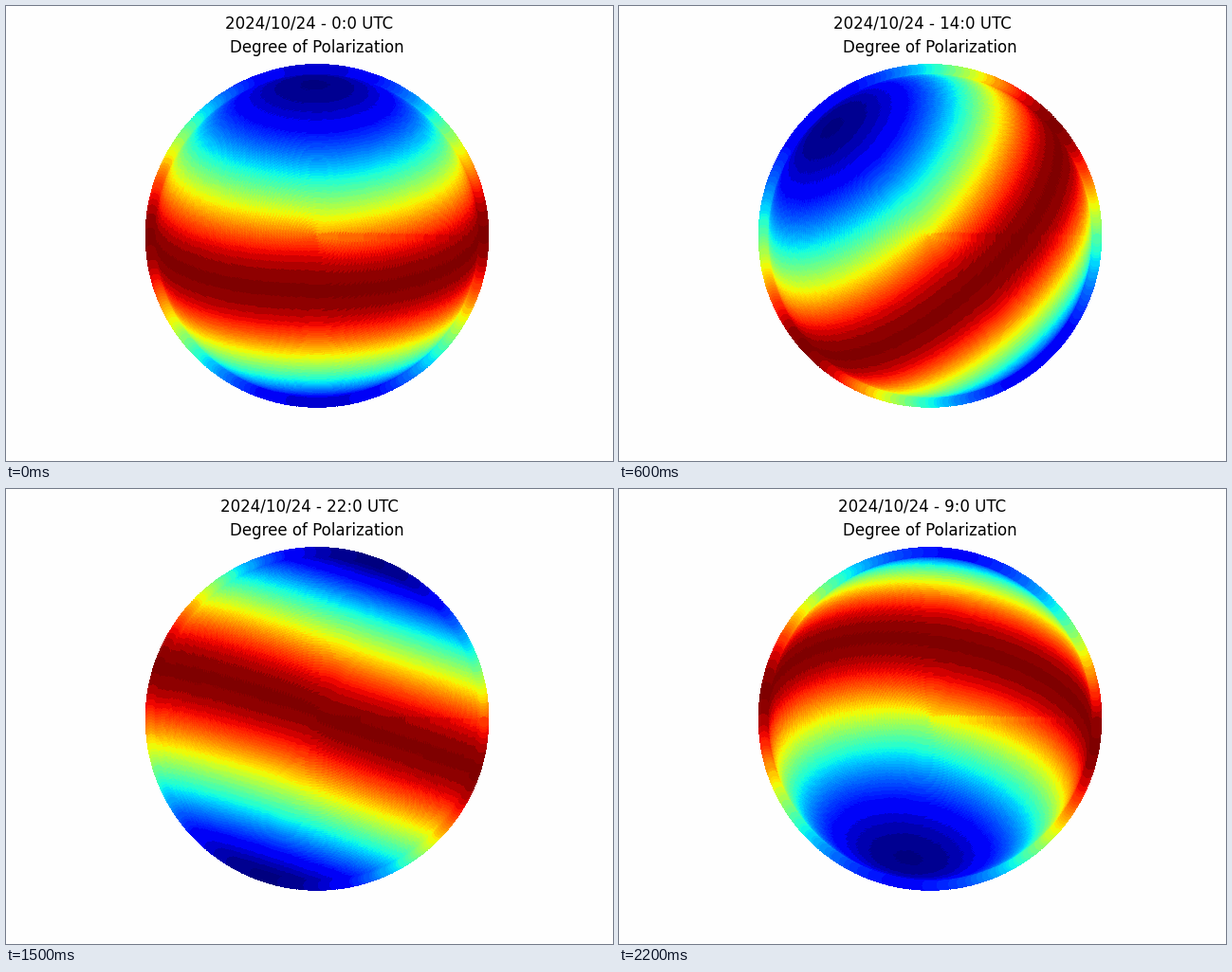
Write a matplotlib script that moves like this. It is 640 px wide and 480 px high and loops after 2300 ms.

```python
import numpy as np
import matplotlib.pyplot as plt
from matplotlib.animation import FuncAnimation

W, H, DPI = 640, 480, 100
CX, CY = 328, 242.4         # zenith on the stage, y down
SKY_R = 176                 # horizon radius in pixels
DOT_R = 5.45                # radius of one sky sample
LAT, LON = np.radians(39.0), -76.85
HOURS = sorted(range(23), key=str)

zen, az = np.meshgrid(np.radians(np.arange(91)), np.radians(np.arange(360)),
                      indexing="ij")
dots_x = (CX + SKY_R * np.sin(zen) * np.cos(az)).ravel()
dots_y = (CY - SKY_R * np.sin(zen) * np.sin(az)).ravel()


def top_dots():
    """Index of the uppermost sample at each pixel, -1 outside the sky."""
    top = np.full((H, W), -1)
    span = np.arange(-6, 7)
    for i, (x, y) in enumerate(zip(dots_x, dots_y)):
        c, r = int(x), int(y)
        dx, dy = c + span + 0.5 - x, r + span + 0.5 - y
        hit = dy[:, None] ** 2 + dx ** 2 <= DOT_R ** 2
        top[r - 6:r + 7, c - 6:c + 7][hit] = i
    return top


top = top_dots()
sky = top >= 0
top_sky = top[sky]

# Group the colormap into coarse colour bands
jet = plt.get_cmap("jet")(np.arange(256), bytes=True)[:, :3].astype(int)
codes = (jet[:, 0] >> 5) * 256 + (jet[:, 1] >> 4) * 8 + (jet[:, 2] >> 5)
band = np.unique(codes, return_inverse=True)[1].ravel()


def sun_position(hour):
    """Zenith angle and azimuth (from north through east), in radians."""
    ecl = np.radians(211.07 + hour * 0.0415)
    dec = np.arcsin(0.3978 * np.sin(ecl))
    ha = np.radians(15 * hour - 180 + 3.97 + LON)
    east = -np.cos(dec) * np.sin(ha)
    north = np.sin(dec) * np.cos(LAT) - np.cos(dec) * np.sin(LAT) * np.cos(ha)
    up = np.sin(dec) * np.sin(LAT) + np.cos(dec) * np.cos(LAT) * np.cos(ha)
    return np.arccos(up), np.arctan2(east, north)


def polarization(hour):
    """Rayleigh degree of polarization at every sample."""
    sz, sa = sun_position(hour)
    cos_g = np.cos(zen) * np.cos(sz) + np.sin(zen) * np.sin(sz) * np.cos(az - sa)
    return ((1 - cos_g ** 2) / (1 + cos_g ** 2)).ravel()


def render(hour):
    dop = polarization(hour)
    dop = (dop - dop.min()) / (dop.max() - dop.min())
    levels = np.minimum(dop * 256, 255).astype(int)[top_sky]
    count = np.bincount(levels, minlength=256)
    total = np.maximum(np.bincount(band, count), 1)
    colors = np.stack([np.bincount(band, count * ch) / total for ch in jet.T], 1)
    img = np.full((H, W, 3), 254, np.uint8)
    img[sky] = colors[band[levels]].astype(np.uint8)
    return img


fig = plt.figure(figsize=(W / DPI, H / DPI), dpi=DPI, facecolor="#fefefe")
ax = fig.add_axes([0, 0, 1, 1])
ax.axis("off")
picture = ax.imshow(render(0), extent=(0, W, H, 0), interpolation="nearest",
                    aspect="auto")
style = dict(ha="center", fontsize=12, family="DejaVu Sans", color="black")
clock = fig.text(0.5, 0.98, "", va="top", **style)
fig.text(CX / W, 0.88 + 6 / 72 * DPI / H, "Degree of Polarization",
         va="baseline", **style)


def update(i):
    hour = HOURS[i]
    picture.set_data(render(hour))
    clock.set_text(f"2024/10/24 - {hour}:0 UTC")
    return picture, clock


anim = FuncAnimation(fig, update, frames=len(HOURS), interval=100,
                     repeat=True, repeat_delay=0)
plt.show()
```
